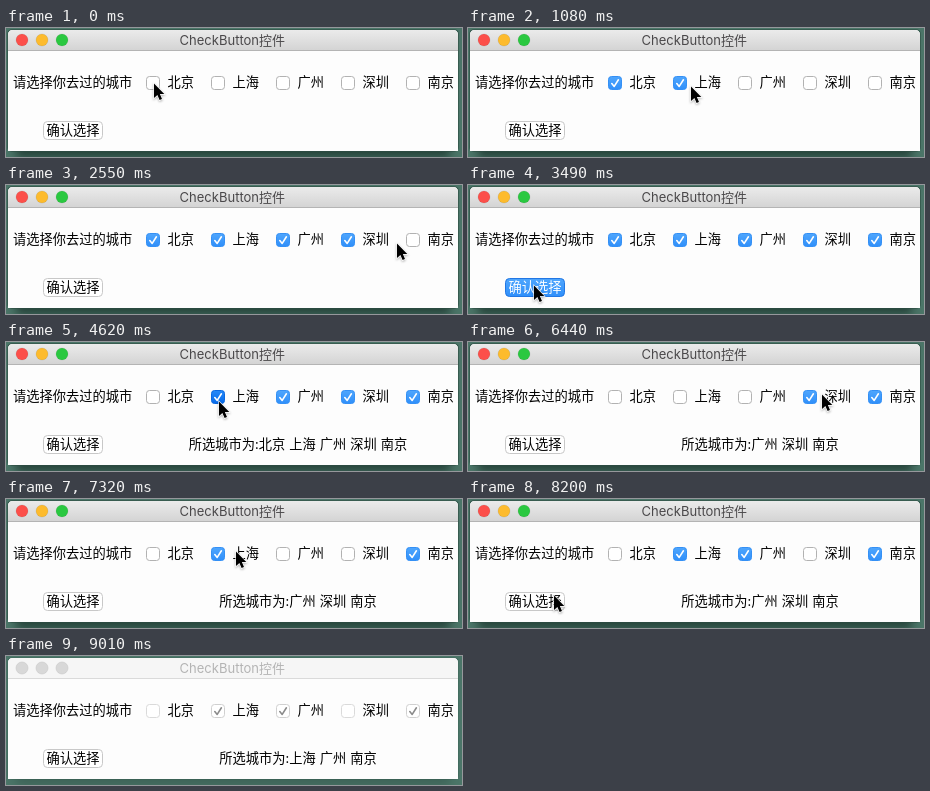
Animation of 456 by 129 pixels, one loop 9050 ms. Source, as an HTML page:

```html
<!DOCTYPE html>
<html lang="zh-CN">
<head>
<meta charset="utf-8">
<title>CheckButton控件</title>
<style>
  html, body { margin: 0; width: 100%; height: 100%; overflow: hidden; background: #4b7568; }
  svg { display: block; width: 456px; height: 129px; }
  text { font: 13.25px "Noto Sans CJK SC", "Noto Sans CJK", sans-serif; fill: #000; word-spacing: 1px; }
  .mid { text-anchor: middle; }
  .title { font: 13px Inter, "Noto Sans CJK SC", "Noto Sans CJK", sans-serif; fill: #4a484a; }
  .light { stroke-width: .6; stroke: rgba(0, 0, 0, .14); }
  .shade { fill: #10251f; opacity: .6; filter: blur(5px); }
  .rim { fill: #2c4b42; opacity: .6; }
  .box rect { fill: #fff; stroke: #b2b2b2; }
  .box path { fill: none; stroke: #fff; stroke-width: 1.6; stroke-linecap: round; stroke-linejoin: round; visibility: hidden; }
  .box.on rect { fill: url(#blue); stroke: #3490f5; }
  .box.on path { visibility: visible; }
  .box.down rect { fill: #e4e4e4; stroke: #a2a2a2; }
  .box.on.down rect { fill: url(#deep); stroke: #0a68e0; }
  .push rect { fill: #fff; stroke: #c8c8c8; }
  .push.down rect { fill: url(#blue); stroke: #2277e4; }
  .push.down text { fill: #fff; }
  #cursor { filter: drop-shadow(0 1px 1px rgba(0, 0, 0, .3)); }
  .idle .bar { fill: #f6f6f6; }
  .idle .title { fill: #b4b4b4; }
  .idle .light { fill: #d8d8d8; stroke: #c8c8c8; }
  .idle .edge { stroke: #dadada; }
  .idle .shade, .idle .rim { opacity: .2; }
  .idle .box rect { fill: #fff; stroke: #dadada; }
  .idle .box.on rect { fill: #fff; stroke: #d0d0d0; }
  .idle .box path { stroke: #8a8a8a; }
  .idle #cursor { visibility: hidden; }
</style>
</head>
<body>
<svg id="stage" viewBox="0 0 456 129">
  <defs>
    <linearGradient id="chrome" x2="0" y2="1"><stop stop-color="#ebebeb"/><stop offset="1" stop-color="#d4d4d4"/></linearGradient>
    <linearGradient id="blue" x2="0" y2="1"><stop stop-color="#4fa6fd"/><stop offset="1" stop-color="#2f8ffa"/></linearGradient>
    <linearGradient id="deep" x2="0" y2="1"><stop stop-color="#2589f8"/><stop offset="1" stop-color="#0669ea"/></linearGradient>
  </defs>
  <rect width="456" height="129" fill="#4b7568"/>
  <rect class="shade" x="10" y="100" width="434" height="30"/>
  <rect class="rim" x="1" y="1" width="452" height="123" rx="5"/>
  <path d="M2 123V7Q2 2 7 2H447Q452 2 452 7V123Z" fill="#fdfdfd"/>
  <path class="bar" d="M2 22V7Q2 2 7 2H447Q452 2 452 7V22Z" fill="url(#chrome)"/>
  <path class="edge" d="M2 22.5H452" stroke="#b4b4b4"/>
  <circle class="light" cx="16" cy="12" r="6" fill="#fc4f4a"/>
  <circle class="light" cx="36" cy="12" r="6" fill="#fdbb2d"/>
  <circle class="light" cx="56" cy="12" r="6" fill="#2ac840"/>
  <text class="title mid" x="226.3" y="17">CheckButton控件</text>
  <text x="7" y="59">请选择你去过的城市</text>
  <g id="boxes"></g>
  <g id="push" class="push">
    <rect x="37.5" y="93.5" width="59" height="18" rx="4"/>
    <text class="mid" x="67" y="107">确认选择</text>
  </g>
  <text id="result" class="mid" x="292" y="107"></text>
  <path id="cursor" d="M0 0V14.6L3.4 11.5L5.6 16.6L8 15.6L5.9 10.6H10.3Z" stroke="#fff" stroke-width="1.2" paint-order="stroke"/>
</svg>
<script>
const LOOP = 9050, IDLE = 9010, STEP = 60, HOLD = 120, GAP = 65, PUSH = -1;
const cities = ["北京", "上海", "广州", "深圳", "南京"];

// height of the pointer over the boxes, then [time, column] of each stop;
// between two columns the pointer only hovers
const legs = [
  { y: 55, stops: [[360, 0]] },
  { y: 58, stops: [[840, 1], [1440, 2], [2090, 3], [2680, 4], [3380, PUSH]] },
  { y: 59, stops: [[4090, 0], [4570, 1], [5270, PUSH]] },
  { y: 52, stops: [[5690, 2.35], [6090, 2], [6400, 3.17], [6540, 3], [7100, 1], [7520, 2], [8280, PUSH]] }
];
const stops = legs.flatMap(({ y, stops }) => stops.map(([at, col]) =>
  col === PUSH ? { at, col, x: 66, y: 100 } : { at, col, x: 148 + GAP * col, y }));
stops.push({ at: 8700, col: NaN, x: 66, y: 135 });

const $ = id => document.getElementById(id);

$("boxes").innerHTML = cities.map((name, i) => {
  const x = 140 + GAP * i;
  return `<g class="box"><rect x="${x + .5}" y="48.5" width="13" height="13" rx="3"/>` +
    `<path d="M${x + 3.8} 55.6l2.4 2.8l4.2 -6.6"/></g><text x="${x + 21.5}" y="59">${name}</text>`;
}).join("");
const boxes = [...document.querySelectorAll(".box")];

// rest at each stop for HOLD, then glide to the next one
function pointer(t) {
  const n = stops.findIndex(s => s.at > t);
  const b = stops.at(n), a = n > 0 ? stops[n - 1] : b;
  const start = a.at + HOLD;
  const u = Math.min(1, Math.max(0, (t - start) / (b.at - start)));
  const k = u * u * (3 - 2 * u);
  return [a.x + (b.x - a.x) * k, a.y + (b.y - a.y) * k];
}

function stateAt(t) {
  const on = cities.map(() => false);
  let down = null, result = "";
  for (const { at, col } of stops) {
    if (t < at) break;
    if (!Number.isInteger(col)) continue;
    if (t < at + HOLD) down = col;
    else if (col === PUSH) result = "所选城市为:" + cities.filter((_, i) => on[i]).join(" ");
    else on[col] = !on[col];
  }
  return { on, down, result };
}

function draw(time) {
  const t = time - time % STEP;
  const { on, down, result } = stateAt(t), [x, y] = pointer(t);
  boxes.forEach((box, i) => {
    box.classList.toggle("on", on[i]);
    box.classList.toggle("down", down === i);
  });
  $("push").classList.toggle("down", down === PUSH);
  if ($("result").textContent !== result) $("result").textContent = result;
  $("cursor").setAttribute("transform", `translate(${Math.round(x)} ${Math.round(y) + .5})`);
  $("stage").classList.toggle("idle", time >= IDLE);
}

const begin = performance.now();
function tick() {
  draw((performance.now() - begin) % LOOP);
  requestAnimationFrame(tick);
}
tick();
</script>
</body>
</html>
```
